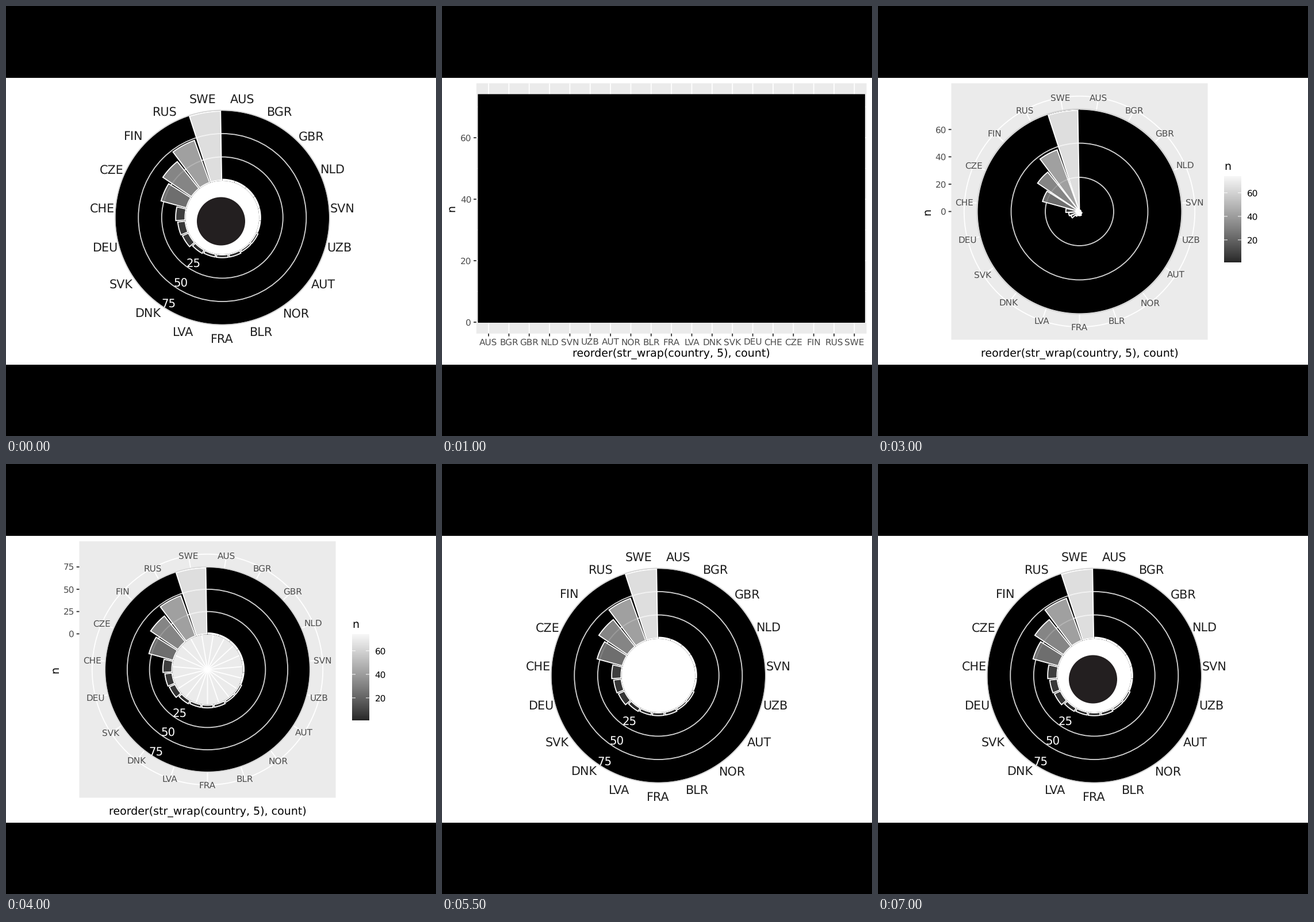
Recreate the animation shown at these times as a matplotlib script. Size 748 by 748 pixels, loop 8000 ms.

```python
import numpy as np
import matplotlib.pyplot as plt
from matplotlib.animation import FuncAnimation
from matplotlib.patches import Circle, Polygon, Rectangle

plt.rcParams.update({"font.family": "DejaVu Sans", "path.snap": False,
                     "text.hinting": "none"})

SIZE, DPI = 748, 64
PX = 72 / DPI              # points per pixel
PT = SIZE / 6 / 72         # pixels per point of the 6 x 4 inch plot
LINE = 1.85
TEXT, TITLE, NUMBER, LARGE = 8.8 * PT, 11 * PT, 11.4 * PT, 12 * PT
TOP, BOTTOM = 125, 624
PANEL_TOP = 134.5
GREY, TICK, AXIS_TEXT = "#EBEBEB", "#333333", "#4D4D4D"
RING = "#D3D3D3"
X_TITLE = "reorder(str_wrap(country, 5), count)"

NAMES = ("AUS BGR GBR NLD SVN UZB AUT NOR BLR FRA "
         "LVA DNK SVK DEU CHE CZE FIN RUS SWE").split()
COUNTS = [1] * 6 + [2, 2, 3, 3, 3, 4, 7, 8, 10, 28, 37, 48, 74]
BARS = list(zip(range(1, 20), NAMES, COUNTS))
PEAK = max(COUNTS)

fig = plt.figure(figsize=(SIZE / DPI, SIZE / DPI), dpi=DPI, facecolor="black")
ax = fig.add_axes([0, 0, 1, 1])


def blue(t):
    low, high = np.array([19, 43, 67]), np.array([86, 177, 247])
    return (low + (high - low) * t) / 255


def grey(t):
    return np.full(3, 38 + 209 * t ** 0.9) / 255


def shade(n, ramp):
    return ramp((n - 1) / (PEAK - 1))


def box(x0, y0, x1, y1, color):
    ax.add_patch(Rectangle((x0, y0), x1 - x0, y1 - y0, fc=color, lw=0, zorder=1))


def shape(points, face, edge):
    ax.add_patch(Polygon(points, closed=True, fc=face, ec=edge, lw=LINE * PX,
                         joinstyle="miter", zorder=1))


def line(x0, y0, x1, y1, color, width=LINE):
    ax.plot([x0, x1], [y0, y1], color=color, lw=width * PX,
            solid_capstyle="butt", zorder=1)


def ring(center, r, color):
    ax.add_patch(Circle(center, r, fill=False, ec=color, lw=LINE * PX, zorder=1))


def label(x, y, s, size=TEXT, color=AXIS_TEXT, ha="center"):
    """Capitals and digits centred vertically on y."""
    ax.text(x, y + 0.365 * size, s, fontsize=size * PX, color=color, ha=ha,
            va="baseline", zorder=1)


def titles(x, n_x, n_y):
    ax.text(x, 609.5, X_TITLE, fontsize=TITLE * PX, ha="center",
            va="baseline", zorder=1)
    ax.text(n_x, n_y, "n", fontsize=TITLE * PX, rotation=90,
            rotation_mode="anchor", ha="center", va="baseline", zorder=1)


def y_axis(left, breaks, y_of):
    for b in breaks:
        line(left - 4.8, y_of(b), left, y_of(b), TICK)
        label(left - 8.6, y_of(b), str(b), ha="right")


def legend(x, mid, ramp):
    top, height = mid - 61.3, 149.6
    colors = np.array([[ramp(t)] for t in np.linspace(1, 0, 150)])
    ax.imshow(colors, extent=(x, x + 30, top + height, top), aspect="auto",
              interpolation="bilinear", zorder=1)
    ax.text(x, mid - 73, "n", fontsize=TITLE * PX, va="baseline", zorder=1)
    for b in (20, 40, 60):
        y = top + height * (PEAK - b) / (PEAK - 1)
        line(x, y, x + 6, y, "white", 1)
        line(x + 24, y, x + 30, y, "white", 1)
        label(x + 39.5, y, str(b), color="black", ha="left")


def blank():
    box(9.5, PANEL_TOP, 738.5, 614, GREY)


def columns(lines=False, ramp=None):
    left, right, bottom = 59.8, 641.8 if ramp else 738.5, 569.8
    unit = (right - left) / 19.2
    scale = (bottom - PANEL_TOP) / 1.1 / (75 if lines else PEAK)
    zero = bottom - 0.05 * (bottom - PANEL_TOP) / 1.1

    def px(x):
        return left + (x - 0.4) * unit

    def py(y):
        return zero - y * scale

    def block(x0, x1, n, face, edge):
        shape([(px(x0), py(0)), (px(x0), py(n)), (px(x1), py(n)), (px(x1), py(0))],
              face, edge)

    box(left, PANEL_TOP, right, bottom, GREY)
    for y in range(0, 71, 10):
        line(left, py(y), right, py(y), "white", LINE / (1 + y // 10 % 2))
    for i, _, _ in BARS:
        line(px(i), PANEL_TOP, px(i), bottom, "white")
    block(0.5, 19.5, PEAK, "black", "black")
    if lines:
        for y in (25, 50, 75):
            line(left, py(y), right, py(y), RING)
    if ramp:
        for i, _, n in BARS:
            block(i - 0.45, i + 0.45, n, (*shade(n, ramp), 0.9), "white")
        legend(670, 352.2, ramp)
    for i, name, _ in BARS:
        line(px(i), bottom, px(i), bottom + 4.8, TICK)
        label(px(i), 584, name)
    y_axis(left, (0, 20, 40, 60), py)
    titles((left + right) / 2, 22.5, 352.2)


def polar(center=(350.5, 357.5), radius=178.4, hole=40, panel=True, axes=True,
          numbers=True, size=TEXT, color=AXIS_TEXT, badge=False):
    cx, cy = center
    rim = radius * 1.125
    breaks = (0, 25, 50, 75) if hole else (0, 20, 40, 60)

    def r_of(y):
        return radius * (y + hole) / (75 + hole)

    def at(x, r):
        a = 2 * np.pi * (np.asarray(x) - 0.5) / 19
        return np.column_stack([cx + r * np.sin(a), cy - r * np.cos(a)])

    def sector(x0, x1, n, face, edge):
        xs = np.linspace(x0, x1, int(20 + 14 * (x1 - x0)))
        shape(np.vstack([at(xs, r_of(n)), at(xs[::-1], r_of(0))]), face, edge)

    if panel:
        half = radius * 1.25
        box(cx - half, cy - half, cx + half, cy + half, GREY)
        for i, _, _ in BARS:
            x, y = at([i], rim)[0]
            line(cx, cy, x, y, "white")
        for r in [rim] + [r_of(b) for b in breaks]:
            ring(center, r, "white")
    sector(0.5, 19.5, PEAK, "black", "black")
    for y in (25, 50, 75):
        ring(center, r_of(y), RING)
    for i, _, n in BARS:
        sector(i - 0.45, i + 0.45, n, (*shade(n, grey), 0.9), "white")
    if numbers:
        for y in (25, 50, 75):
            label(*at([11.7], r_of(y - 7))[0], str(y), NUMBER, "white")
    for i, name, _ in BARS:
        label(*at([i], rim)[0], name, size, color)
    if axes:
        y_axis(cx - radius * 1.25, breaks, lambda b: cy - r_of(b))
        titles(cx, 91, cy)
        legend(602, cy, grey)
    if badge:
        ax.add_patch(Circle((374, 374.5), 42, fc="#231F20", lw=0, zorder=1))


def final(badge=False):
    polar((376.3, 368), 186.6, panel=False, axes=False, size=LARGE,
          color="#1F1F1F", badge=badge)


# One step every half second.
STEPS = [
    lambda: final(badge=True),
    blank,
    columns,
    lambda: columns(lines=True),
    lambda: columns(lines=True, ramp=blue),
    lambda: columns(lines=True, ramp=grey),
    lambda: polar(hole=0, numbers=False),
    lambda: polar(hole=0),
    polar,
    lambda: polar(panel=False),
    lambda: polar((376.3, 368.6), 187, panel=False, axes=False),
    final,
    polar,
    final,
    lambda: final(badge=True),
    lambda: final(badge=True),
]


def draw(i):
    ax.clear()
    ax.set_axis_off()
    box(0, TOP, SIZE, BOTTOM, "white")
    STEPS[i]()
    ax.set_xlim(0, SIZE)
    ax.set_ylim(SIZE, 0)
    return []


anim = FuncAnimation(fig, draw, frames=len(STEPS), interval=500,
                     init_func=lambda: [], repeat=True, repeat_delay=0)
plt.show()
```
